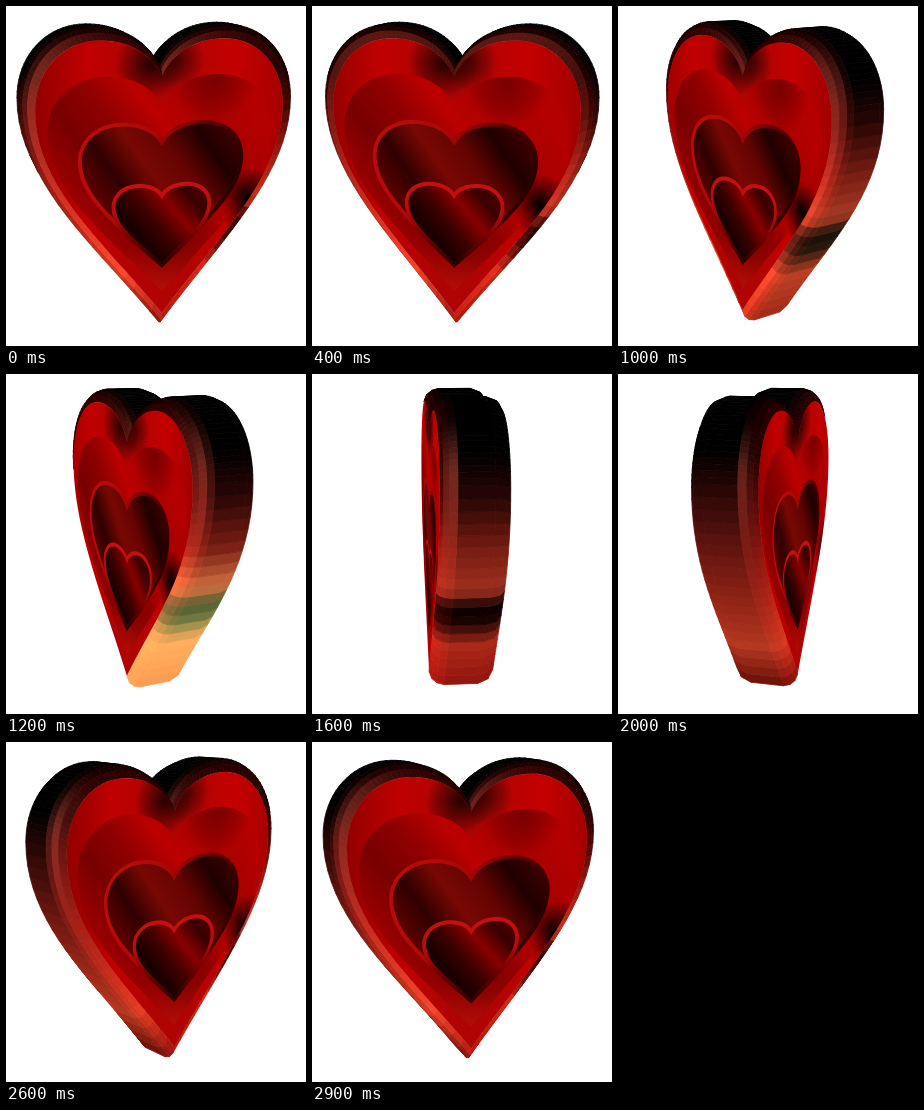
Write an HTML page with a canvas that moves like this. It is 300 px wide and 340 px high and loops after 3 s.

```html
<!DOCTYPE html>
<html lang="en">
<head>
<meta charset="utf-8">
<title>Turning heart</title>
<style>
html, body { margin: 0; width: 100%; height: 100%; overflow: hidden; background: #fff; }
canvas { display: block; }
</style>
</head>
<body>
<canvas id="stage" width="300" height="340"></canvas>
<script>
const ctx = document.getElementById('stage').getContext('2d');
const CX = 149, CY = 160, DISTANCE = 1050, TILT = 0.2, STEPS = 20;
let angle, cos, sin;

// Right half of the heart as cubic curves, from notch to tip
const curves = [
  [0, -103, 12, -128, 38, -142, 68, -142],
  [68, -142, 108, -142, 136, -111, 136, -70],
  [136, -70, 136, 10, 62, 72, 0, 150]
];
const bezier = (a, b, c, d, t) => {
  const u = 1 - t;
  return u * u * u * a + 3 * u * u * t * b + 3 * u * t * t * c + t * t * t * d;
};
const half = curves.flatMap(c => Array.from({ length: STEPS }, (_, i) => [
  bezier(c[0], c[2], c[4], c[6], i / STEPS), bezier(c[1], c[3], c[5], c[7], i / STEPS)
]));
half.push([0, 150]);
const outline = [...half, ...half.slice(1, -1).reverse().map(([x, y]) => [-x, y])];

// Edge profile: inset and depth of each ring, then the tilt of each band
const rings = [[13, -32], [4, -27], [0, -17], [0, 17], [2, 24], [6, 29], [13, 32]];
const bandTilt = [-0.9, -0.5, 0, 0.3, 0.6, 0.9];

const rightRamp = [[-100, 0, 0, 0], [-60, 38, 6, 4], [-10, 120, 28, 18], [32, 160, 48, 30],
  [52, 10, 0, 0], [70, 30, 4, 2], [98, 170, 40, 24], [150, 145, 20, 10]];
const leftRamp = [[-100, 0, 0, 0], [-60, 45, 8, 6], [0, 108, 22, 16], [60, 155, 40, 25],
  [100, 180, 56, 32], [150, 105, 14, 8]];

function sample(ramp, y) {
  const k = ramp.findIndex(stop => stop[0] >= y);
  if (k <= 0) return ramp[k ? ramp.length - 1 : 0].slice(1);
  const a = ramp[k - 1], b = ramp[k], t = (y - a[0]) / (b[0] - a[0]);
  return [1, 2, 3].map(n => a[n] + (b[n] - a[n]) * t);
}

function project(x, y, z) {
  const depth = x * sin + z * cos, scale = 1 + depth / DISTANCE;
  return [CX + (x * cos - z * sin) * scale, CY + (y + depth * TILT) * scale, depth];
}

function trace(points) {
  ctx.beginPath();
  points.forEach(p => ctx.lineTo(p[0], p[1]));
  ctx.closePath();
}

function shade(x, y, nx, ny, tilt) {
  const flat = Math.sqrt(1 - tilt * tilt);
  const wx = nx * flat * cos - tilt * sin, wz = nx * flat * sin + tilt * cos;
  const shine = tilt > 0 ? Math.max(0, -0.25 * wx - 0.12 * ny * flat + 0.96 * wz) ** 9 : 0;
  const glow = Math.exp(-(((angle - 60) / 9) ** 2)) * Math.min(1, Math.max(0, (y + 10) / 90));
  const red = 45 * Math.max(0, tilt);
  const [r, g, b] = sample(x > 0 ? rightRamp : leftRamp, y);
  return `rgb(${r + red + 80 * shine + 100 * glow},${g + 38 * shine + 135 * glow},${b + 30 * shine + 70 * glow})`;
}

function drawEdge() {
  const grid = rings.map(([inset, z]) => outline.map(([x, y]) =>
    project(x * (1 - inset / 136), y * (1 - inset / 146), z)));
  const quads = [], count = outline.length;
  bandTilt.forEach((tilt, band) => outline.forEach((p, i) => {
    const next = (i + 1) % count, q = outline[next];
    const a = grid[band][i], b = grid[band][next], c = grid[band + 1][next], d = grid[band + 1][i];
    const facing = (c[0] - a[0]) * (d[1] - b[1]) - (c[1] - a[1]) * (d[0] - b[0]);
    if (facing <= 0) return;
    const dx = q[0] - p[0], dy = q[1] - p[1], len = Math.hypot(dx, dy);
    quads.push({
      points: [a, b, c, d],
      depth: a[2] + b[2] + c[2] + d[2],
      color: shade((p[0] + q[0]) / 2, (p[1] + q[1]) / 2, dy / len, -dx / len, tilt)
    });
  }));
  quads.sort((a, b) => a.depth - b.depth);
  ctx.lineWidth = 0.8;
  for (const quad of quads) {
    trace(quad.points);
    ctx.fillStyle = ctx.strokeStyle = quad.color;
    ctx.fill();
    ctx.stroke();
  }
}

function gradient(x0, y0, x1, y1, ...colors) {
  const g = ctx.createLinearGradient(x0, y0, x1, y1);
  colors.forEach((c, i) => g.addColorStop(i / (colors.length - 1), c));
  return g;
}

function blob(x, y, radius, color) {
  const g = ctx.createRadialGradient(x, y, 0, x, y, radius);
  g.addColorStop(0, color);
  g.addColorStop(1, 'transparent');
  return g;
}

// Outlines follow the perspective; paint lies in the plane of the face
function drawHeart(sx, sy, shift, fills, rim) {
  trace(outline.map(([x, y]) => project(x * sx, y * sy + shift, 32)));
  ctx.save();
  ctx.transform(cos, sin * TILT, 0, 1, CX - 32 * sin, CY + 32 * cos * TILT);
  for (const fill of fills) {
    ctx.fillStyle = fill;
    ctx.fill();
  }
  if (rim) {
    ctx.strokeStyle = rim;
    ctx.lineWidth = 4;
    ctx.stroke();
  }
  ctx.restore();
}

function drawFace() {
  drawHeart(0.905, 0.91, 0, [
    gradient(-125, 0, 125, 0, '#960000', '#c00000', '#b00404', '#b00404', '#c40000', '#a40000'),
    blob(-12, -108, 36, 'rgba(20,0,0,.85)'),
    blob(14, -112, 30, 'rgba(40,0,0,.7)'),
    blob(88, 30, 34, '#000')
  ]);
  drawHeart(0.82, 0.72, 8, [
    gradient(-90, 20, 60, -100, '#980000', '#780000', '#900000', '#bc0000', '#a80000', '#b40000'),
    blob(55, -90, 42, 'rgba(40,0,0,.4)'),
    blob(88, 28, 30, '#000'),
    gradient(0, 70, 0, 115, 'rgba(170,8,4,0)', '#b00c06')
  ]);
  drawHeart(0.59, 0.47, 19, [
    gradient(-65, 30, 60, -60, '#600000', '#300000', '#780804', '#640402', '#200000', '#400000')
  ], gradient(-70, -10, 70, 40, '#b80c0c', '#a80808', '#600000', '#280000'));
  drawHeart(0.35, 0.267, 50, [
    gradient(-40, 75, 40, 5, '#400000', '#180000', '#400000', '#880000', '#380000', '#580000')
  ], gradient(0, 15, 0, 90, '#c41010', '#b40c0c', '#700000', '#300000'));
}

function draw(now) {
  const step = Math.floor(now % 3000 / 100);
  angle = -12 + step * 6;
  if (angle > 90) angle -= 180;
  cos = Math.cos(angle * Math.PI / 180);
  sin = Math.sin(angle * Math.PI / 180);
  ctx.fillStyle = '#fff';
  ctx.fillRect(0, 0, 300, 340);
  drawEdge();
  drawFace();
  requestAnimationFrame(() => draw(performance.now() - start));
}
const start = performance.now();
draw(0);
</script>
</body>
</html>
```
